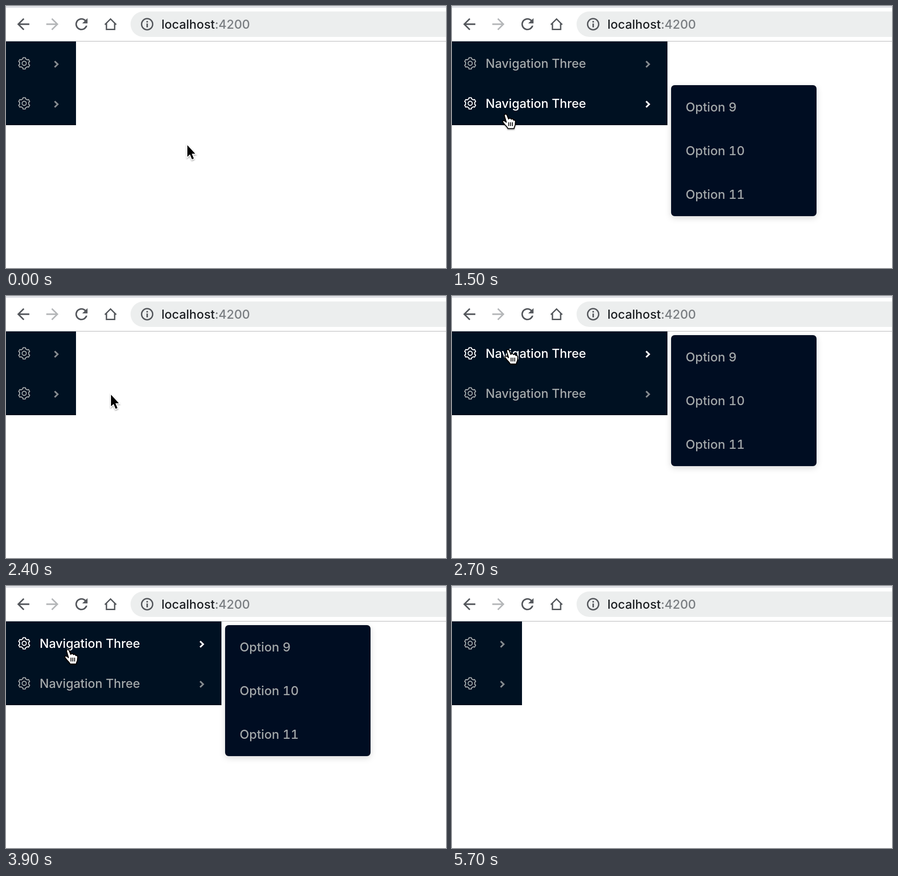
Recreate the animation shown at these times as an HTML page. Size 968 px wide and 576 px high, loop 6000 ms.

```html
<!DOCTYPE html>
<html lang="en">
<head>
<meta charset="utf-8">
<title>Collapsible side menu</title>
<style>
  html, body { margin: 0; width: 100%; height: 100%; overflow: hidden; background: #fff; }
  svg { display: block; width: 968px; height: 576px; }
  text { font-family: Inter, Roboto, sans-serif; font-size: 27px; font-weight: 450; }
  .row { color: #a3a8aa; }
  .row.active { color: #fff; }
  .row.fading { color: #4ba3ea; }
  .row .chevron { stroke: #858b8f; }
  .row.active .chevron { stroke: #fff; }
  .row.fading .chevron { stroke: #afb4b8; }
  .popup text { font-size: 27.4px; fill: #a1a6a8; font-variant-numeric: tabular-nums; }
</style>
</head>
<body>
<svg viewBox="0 0 968 576">
  <defs>
    <filter id="popupShadow" x="-10%" y="-10%" width="120%" height="120%">
      <feDropShadow dx="0" dy="4" stdDeviation="7" flood-opacity=".15"/>
    </filter>
    <filter id="cursorShadow" x="-50%" y="-50%" width="200%" height="200%">
      <feDropShadow dx="0" dy="2" stdDeviation="1.5" flood-opacity=".35"/>
    </filter>
    <path id="back" d="M20 11H7.83l5.59-5.59L12 4l-8 8 8 8 1.41-1.41L7.83 13H20z"/>
  </defs>

  <!-- browser bar -->
  <rect width="968" height="4" fill="#dfe0e5"/>
  <rect y="77" width="968" height="1" fill="#aeafb1"/>
  <rect x="274" y="12" width="740" height="56" rx="28" fill="#eceeee"/>
  <g fill="#55585d">
    <use href="#back" transform="translate(18 20) scale(1.667)"/>
    <use href="#back" transform="translate(122 20) scale(-1.667 1.667)" fill="#b5b7b9"/>
    <path transform="translate(146 20) scale(1.667)" d="M17.65 6.35A7.96 7.96 0 0 0 12 4a8 8 0 1 0 7.73 10h-2.08A6 6 0 1 1 12 6c1.66 0 3.14.69 4.22 1.78L13 11h7V4z"/>
    <path d="M309 33h3.2v3.2H309zM309 38.5h3.2V47H309z"/>
  </g>
  <g fill="none" stroke="#55585d" stroke-width="3">
    <path d="M217.5 41 230 28.5 242.5 41M221 38.5V51.5H239V38.5"/>
    <circle cx="310.5" cy="40" r="12.2"/>
  </g>
  <text x="342" y="50" fill="#1c1f23">localhost<tspan fill="#7b7f83">:4200</tspan></text>

  <!-- side menu -->
  <rect id="panel" y="78" height="184" fill="#001122"/>
  <rect id="panelEdge" y="259" height="3" fill="#000d1b"/>
  <g id="rows"></g>

  <g id="popup" class="popup">
    <rect x="482" y="86" width="320" height="288" rx="8" fill="#001122" filter="url(#popupShadow)"/>
    <text x="514" y="144">Option 9</text>
    <text x="514" y="240">Option 10</text>
    <text x="514" y="336">Option 11</text>
  </g>

  <!-- pointers, each with its top left corner at 0,0 -->
  <g id="arrow" filter="url(#cursorShadow)">
    <path d="M1 2V27.5L6.7 22.3 11.2 33 15.2 31.3 10.7 20.8H18.3Z" stroke="#fff" stroke-width="3.4" paint-order="stroke"/>
  </g>
  <g id="hand" filter="url(#cursorShadow)">
    <path d="M5.5 6C4 2 9 0 11 4L14.5 12.5C16.5 10 19.5 10.5 20.5 13 23 11.3 25 12.5 25.5 15 28 14 30 16 29.5 19L29 25C28.5 29 26.5 30 26.5 33.5H13C12 30 7.5 26.5 5 23.5 3 21 0 18 2 16.3 4 15.2 6.5 17 9.5 19.5Z"
      fill="#fff" stroke="#000" stroke-width="2" stroke-linejoin="round"/>
    <path d="M15 19.5V28M19 19.5V28M23 19.5V28" stroke="#000" stroke-width="1.8"/>
  </g>
  <g id="beam" fill="none">
    <path d="M1 1Q6 1 6.5 4Q7 1 12 1M6.5 4V25M1 28Q6 28 6.5 25Q7 28 12 28M4 18H9" stroke="#222" stroke-width="2"/>
  </g>
</svg>

<script>
const $ = id => document.getElementById(id);
const STEP_MS = 300;

// [menu open, lit row, lit style, popup row, popup opacity, pointer, x, y]
const steps = [
  [0, 0, '',       0, 0,   'arrow', 398, 304],
  [0, 0, '',       0, 0,   'arrow',  99, 309],
  [1, 2, 'active', 2, 1,   'hand',   59, 228],
  [1, 2, 'active', 2, 1,   'hand',   68, 230],
  [1, 2, 'active', 2, 1,   'hand',   76, 233],
  [1, 2, 'active', 2, 1,   'hand',  110, 236],
  [0, 2, 'fading', 2, .13, 'arrow', 434, 359],
  [0, 0, '',       0, 0,   'arrow', 450, 354],
  [0, 0, '',       0, 0,   'arrow', 230, 215],
  [1, 1, 'active', 1, 1,   'hand',  115, 116],
  [1, 1, 'active', 1, 1,   'hand',  150, 122],
  [0, 0, '',       0, 0,   'arrow', 478, 180],
  [1, 1, 'active', 0, 0,   'hand',  190, 138],
  [1, 1, 'active', 1, 1,   'hand',  128, 138],
  [1, 1, 'active', 1, 1,   'hand',  128, 150],
  [1, 2, 'active', 2, 1,   'hand',  125, 215],
  [1, 2, 'active', 2, 1,   'hand',  121, 255],
  [0, 0, '',       0, 0,   'arrow', 490, 298],
  [0, 0, '',       0, 0,   'beam',  430,  20],
  [0, 0, '',       0, 0,   '',        0,   0]
];

function gearPath() {
  const profile = [[10.3, -17], [12.8, -11.5], [12.8, 11.5], [10.3, 17]];
  const points = [];
  for (let tooth = 0; tooth < 6; tooth++) {
    for (const [radius, offset] of profile) {
      const angle = (tooth * 60 + offset - 90) * Math.PI / 180;
      points.push((radius * Math.cos(angle)).toFixed(2) + ' ' + (radius * Math.sin(angle)).toFixed(2));
    }
  }
  return 'M' + points.join('L') + 'Z';
}

const rowMarkup = y => `
  <g class="row" transform="translate(0 ${y})">
    <g transform="translate(40 0)" fill="none" stroke="currentColor" stroke-width="2.1" stroke-linejoin="round">
      <path d="${gearPath()}"/><circle r="4.6"/>
    </g>
    <text class="label" x="74" y="10" fill="currentColor">Navigation Three</text>
    <path class="chevron" d="M107 -4.5 113.7 2 107 8.5" fill="none" stroke-width="3.6"/>
  </g>`;

$('rows').innerHTML = rowMarkup(126) + rowMarkup(214);
const rows = [...document.querySelectorAll('.row')];
const pointers = ['arrow', 'hand', 'beam'];

function show([open, litRow, litStyle, popupRow, opacity, pointer, x, y]) {
  const width = open ? 474 : 154;
  $('panel').setAttribute('width', width);
  $('panelEdge').setAttribute('width', width);
  rows.forEach((row, i) => {
    row.setAttribute('class', 'row ' + (litRow === i + 1 ? litStyle : ''));
    row.querySelector('.label').style.display = open ? '' : 'none';
    row.querySelector('.chevron').setAttribute('transform', `translate(${open ? 320 : 0} 0)`);
  });
  $('popup').setAttribute('opacity', opacity);
  $('popup').setAttribute('transform', `translate(0 ${popupRow === 2 ? 88 : 0})`);
  for (const name of pointers) {
    $(name).style.display = name === pointer ? '' : 'none';
    $(name).setAttribute('transform', `translate(${x} ${y})`);
  }
}

let current = -1;
const start = performance.now();
function tick() {
  const elapsed = Math.max(0, performance.now() - start);
  const index = Math.floor(elapsed / STEP_MS) % steps.length;
  if (index !== current) show(steps[current = index]);
  requestAnimationFrame(tick);
}
tick();
</script>
</body>
</html>
```
